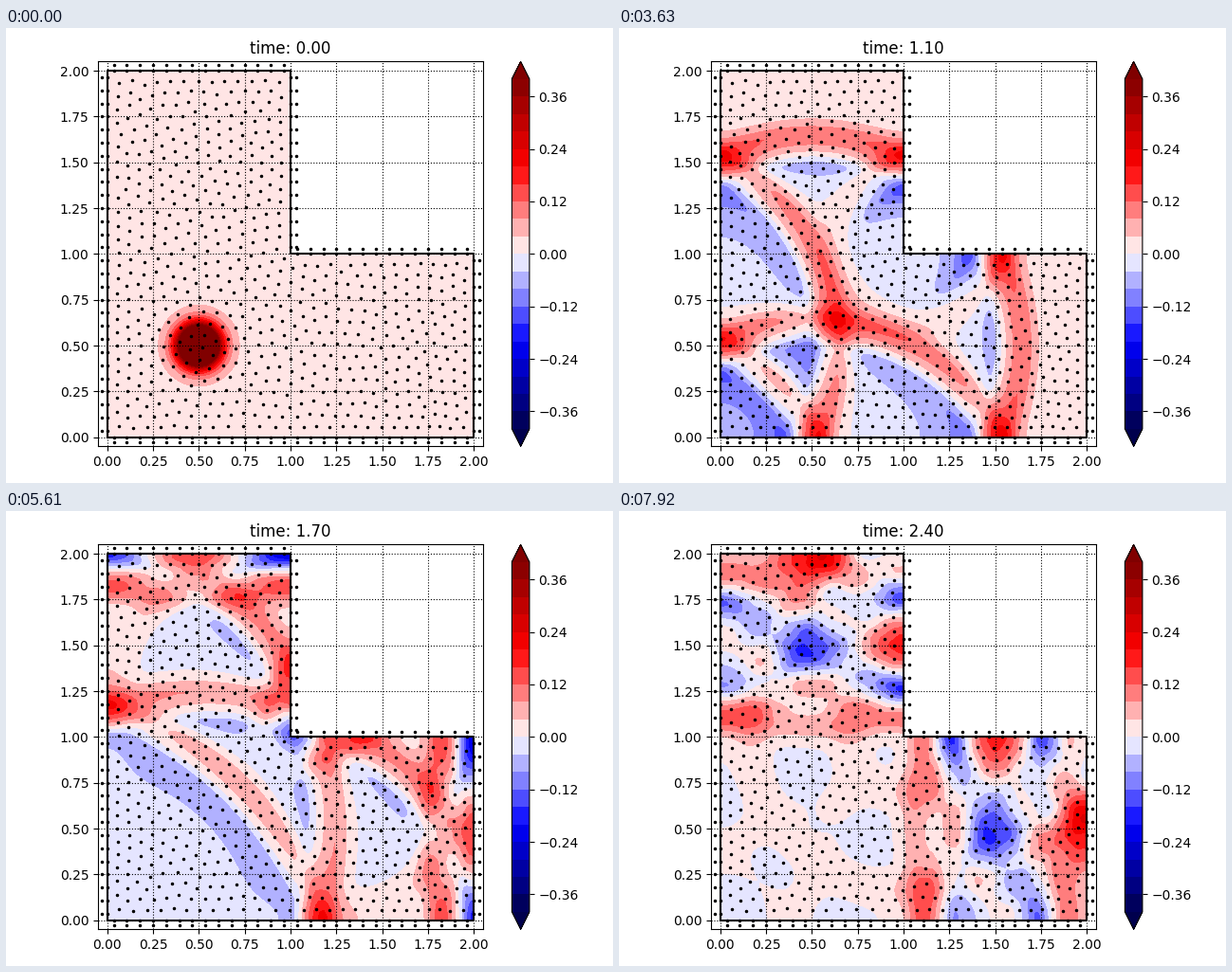
A matplotlib script that plays this animation: 640 by 480 pixels, repeating every 8000 ms.

```python
import numpy as np
import matplotlib.pyplot as plt
from matplotlib.animation import FuncAnimation

W, H, DPI = 640, 480, 100
LOOP, INTERVAL, HOLD = 8000, 40, 330      # ms
STATES, SUBSTEPS = 25, 15
N = 200                                   # cells along each side
DX = 2 / N
DT = 0.1 / SUBSTEPS
CORNERS = np.array([[0, 0], [2, 0], [2, 1], [1, 1], [1, 2], [0, 2]], float)


def wave_states():
    """Wave equation on the L-shape with free edges, sampled every 0.1."""
    cell = np.ones((N, N))
    cell[N // 2:, N // 2:] = 0
    c = np.pad(cell, 1)
    wx = (c[:-1, 1:-1] + c[1:, 1:-1]) / 2
    wy = (c[1:-1, :-1] + c[1:-1, 1:]) / 2
    area = (c[:-1, :-1] + c[1:, :-1] + c[:-1, 1:] + c[1:, 1:]) / 4
    outside = area == 0
    inv = 1 / (np.where(outside, 1, area) * DX ** 2)

    def laplacian(u):
        out = np.zeros_like(u)
        fx = wx * np.diff(u, axis=1)
        fy = wy * np.diff(u, axis=0)
        out[:, :-1] += fx
        out[:, 1:] -= fx
        out[:-1] += fy
        out[1:] -= fy
        return out * inv

    s = np.linspace(0, 2, N + 1)
    x, y = np.meshgrid(s, s)
    u = 1 / (1 + (np.hypot(x - 0.5, y - 0.5) / 0.1) ** 4)
    prev = u + 0.5 * DT ** 2 * laplacian(u)
    states = []
    for _ in range(STATES):
        states.append(np.ma.array(u, mask=outside))
        for _ in range(SUBSTEPS):
            u, prev = 2 * u - prev + DT ** 2 * laplacian(u), u
    return x, y, states


def inside(p, m=0.0):
    lo, hi = p.min(axis=1), p.max(axis=1)
    return (lo > m) & (hi < 2 - m) & (lo < 1 - m)


def edge_nodes(per_unit=14, gap=0.03):
    edge, ghost = [], []
    for a, b in zip(CORNERS, np.roll(CORNERS, -1, axis=0)):
        d = b - a
        length = np.hypot(*d)
        k = int(per_unit * length)
        pts = a + np.outer((np.arange(k) + 0.5) / k, d)
        edge.append(pts)
        ghost.append(pts + gap * np.array([d[1], -d[0]]) / length)
    return np.vstack(edge), np.vstack(ghost)


def inner_nodes(edge, count=620, rounds=80):
    """Random points pushed apart until they are evenly spread."""
    rng = np.random.default_rng(4)
    p = rng.uniform(0, 2, (4 * count, 2))
    p = p[inside(p, 0.03)][:count]
    for k in range(rounds):
        q = np.vstack([p, edge])
        dx = p[:, :1] - q[:, 0]
        dy = p[:, 1:] - q[:, 1]
        r2 = dx ** 2 + dy ** 2
        r2[r2 < 1e-12] = np.inf
        pull = 1 / (r2 * r2 * np.sqrt(r2))
        f = np.stack([(dx * pull).sum(1), (dy * pull).sum(1)], 1)
        f /= np.hypot(f[:, 0], f[:, 1])[:, None] + 1e-12
        new = p + 0.012 * (1 - 0.9 * k / rounds) * f
        p = np.where(inside(new, 0.02)[:, None], new, p)
    return p


fig = plt.figure(figsize=(W / DPI, H / DPI), dpi=DPI)
ax = fig.add_axes([97 / W, 38.65 / H, 406 / W, 406 / H])
cax = fig.add_axes([533.4 / W, 38.65 / H, 18.5 / W, 406 / H])

x, y, states = wave_states()
levels = np.linspace(-0.4, 0.4, 21)
fills = [ax.contourf(x[::2, ::2], y[::2, ::2], u[::2, ::2], levels,
                     cmap="seismic", extend="both", corner_mask=False)
         for u in states]
fig.colorbar(fills[0], cax=cax, ticks=np.linspace(-0.36, 0.36, 7))

edge, ghost = edge_nodes()
nodes = np.vstack([inner_nodes(edge), edge, ghost])
outline = np.vstack([CORNERS, CORNERS[:1]])
ax.plot(*outline.T, "k-", lw=1.5)
ax.plot(*nodes.T, "k.", ms=3)
ax.grid(ls=":", color="k")
ticks = np.linspace(0, 2, 9)
ax.set(xlim=(-0.05, 2.05), ylim=(-0.05, 2.05), xticks=ticks, yticks=ticks)
title = ax.set_title("time: 0.00")


def update(i):
    k = min((i * INTERVAL + 30) // HOLD, STATES - 1)
    for j, fill in enumerate(fills):
        fill.set_visible(j == k)
    title.set_text(f"time: {k / 10:.2f}")
    return [*fills, title]


anim = FuncAnimation(fig, update, frames=LOOP // INTERVAL, interval=INTERVAL,
                     init_func=lambda: update(0), repeat=True, repeat_delay=0)
plt.show()
```
